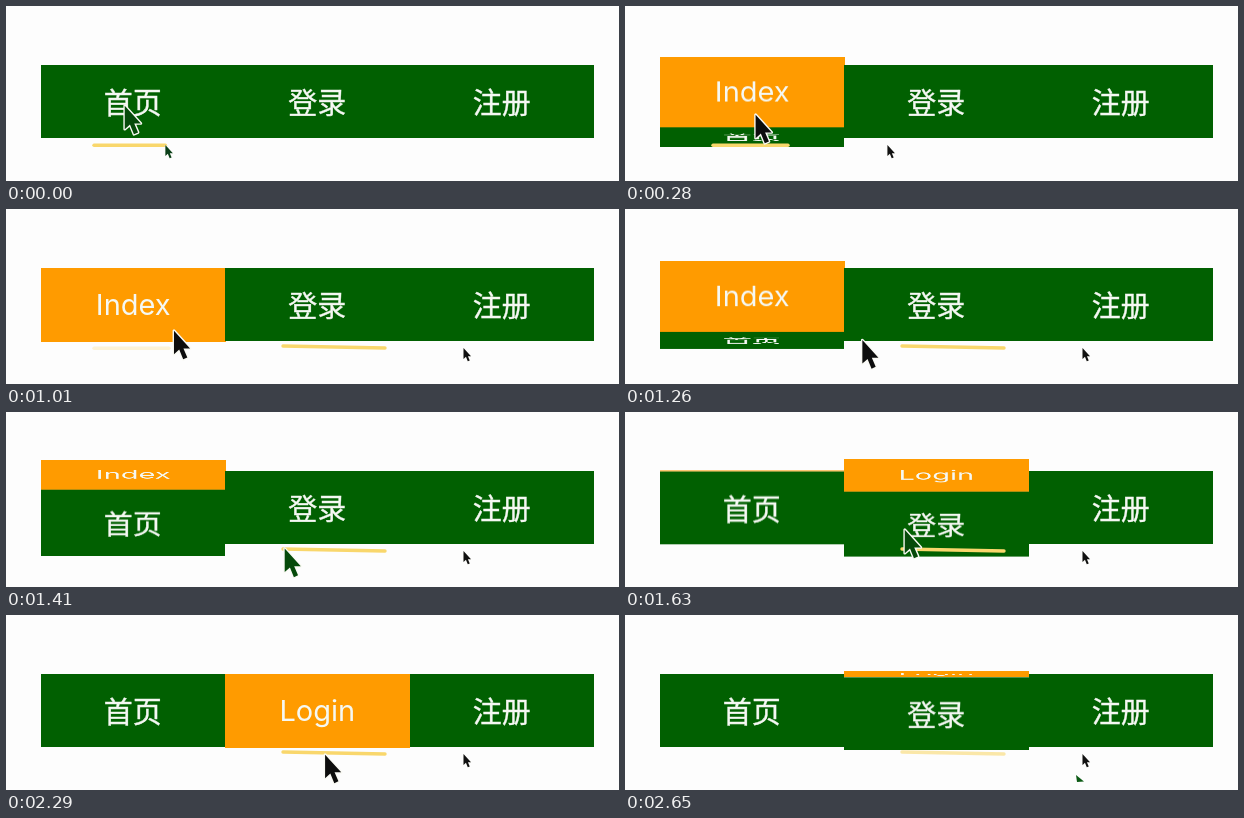
Animation of 613x175 px, one loop 2720 ms. Source, as an HTML page:

```html
<!DOCTYPE html>
<html lang="zh">
<head>
<meta charset="utf-8">
<title>Cube navigation</title>
<style>
  html, body { margin: 0; width: 100%; height: 100%; overflow: hidden; background: #fdfdfd; }
  nav {
    position: absolute; left: 34.5px; top: 58.5px; width: 553.5px; height: 73.5px;
    display: flex;
    font: 29px/73.5px "Noto Sans CJK SC", "Noto Sans CJK", sans-serif;
    color: #f5f8f3; text-align: center;
    filter: blur(.4px);
  }
  .cube { position: relative; flex: 1; transform-style: preserve-3d; }
  .cube span { position: absolute; inset: 0; backface-visibility: hidden; }
  .front {
    background: #016001; transform: translateZ(36.75px);
    -webkit-text-stroke: .4px;
  }
  .top {
    background: #ff9b00; transform: rotateX(90deg) translateZ(36.75px);
    font-family: Inter, sans-serif;
  }
  svg { position: absolute; left: 0; top: 0; }
  .mark { stroke: #f9d76c; stroke-width: 3.4; stroke-linecap: round; }
  .arrow { stroke: #fafaf4; paint-order: stroke; stroke-linejoin: round; }
</style>
</head>
<body>
<nav>
  <div class="cube"><span class="front">首页</span><span class="top">Index</span></div>
  <div class="cube"><span class="front">登录</span><span class="top">Login</span></div>
  <div class="cube"><span class="front">注册</span></div>
</nav>
<svg width="613" height="175" viewBox="0 0 613 175">
  <defs>
    <path id="shape" d="M0 0V25.5L5.7 20.5L10 31L14.5 29L10.3 19.2H17.5Z"/>
    <path id="bar" d="M-6 -14Q0 -14 0 -9Q0 -14 6 -14M0 -9V9M-6 14Q0 14 0 9Q0 14 6 14M-4 1H4"/>
  </defs>
  <line id="mark1" class="mark" x1="88" y1="139.3" y2="139.3"/>
  <line id="mark2" class="mark" x1="277" y1="137"/>
  <use id="pen" class="arrow" href="#shape" stroke-width="2"/>
  <use id="arrow" class="arrow" href="#shape" stroke-width="3"/>
  <g id="beam" fill="none" stroke-linecap="round">
    <use href="#bar" stroke="#f4f6ee" stroke-width="5"/>
    <use href="#bar" stroke="#17472a" stroke-width="2.4"/>
  </g>
  <path id="tail" d="M451 160L459 166.5L452 167Z" fill="#0b5a14"/>
</svg>
<script>
  const LOOP = 2720, TURN = 500;

  // pointer way points: time, x, y
  const way = [
    [0, 118, 99], [590, 143, 118], [1010, 167, 121], [1410, 278, 136],
    [1630, 279, 117], [2290, 318, 139], [2600, 440, 137]
  ];

  const $ = id => document.getElementById(id);
  const cubes = document.querySelectorAll('.cube');
  const clamp = (v, lo, hi) => Math.min(hi, Math.max(lo, v));
  const ramp = (t, from, to) => clamp((t - from) / (to - from), 0, 1);

  function pointerAt(t) {
    const n = clamp(way.findIndex(k => k[0] > t), 0, way.length) || way.length - 1;
    const a = way[n - 1], b = way[n], p = ramp(t, a[0], b[0]);
    return [1, 2].map(i => a[i] + (b[i] - a[i]) * p);
  }

  // CSS "ease": cubic-bezier(.25, .1, .25, 1)
  function ease(x) {
    const curve = (a, b, u) => 3 * a * u * (1 - u) ** 2 + 3 * b * u * u * (1 - u) + u ** 3;
    let lo = 0, hi = 1;
    for (let i = 0; i < 20; i++) {
      const mid = (lo + hi) / 2;
      if (curve(.25, .25, mid) < x) lo = mid; else hi = mid;
    }
    return curve(.1, 1, lo);
  }

  const turn = (t, enter, leave) =>
    90 * (ease(ramp(t, enter, enter + TURN)) - ease(ramp(t, leave, leave + TURN)));
  const show = (el, on) => el.setAttribute('visibility', on ? 'visible' : 'hidden');
  const place = (el, x, y, s = 1) =>
    el.setAttribute('transform', `translate(${x} ${y}) scale(${s})`);

  function set(el, attrs) {
    for (const name in attrs) el.setAttribute(name, attrs[name]);
  }

  function stall(t) {
    const since = (t - 520) % 556;
    return Math.min(since >= 0 && since < 70 ? t - since : t, 2650);
  }

  function draw(time) {
    const t = stall(time);

    const angles = [turn(t, 20, 1195), turn(t, 1530, 2295)];
    angles.forEach((a, i) => cubes[i].style.transform = `rotateX(${-a}deg)`);

    // the pen moves evenly and draws both underlines on its way
    const penX = 159 + 298.5 * ramp(t, 0, 811);
    const end2 = clamp(penX - 24, 277, 379);
    set($('mark1'), { x2: Math.min(penX, 163), opacity: 1 - ramp(t, 500, 1200) });
    set($('mark2'), {
      x2: end2, y2: 137 + (end2 - 277) * .02, opacity: 1 - .5 * ramp(t, 2290, LOOP)
    });
    show($('mark2'), penX > 301);
    place($('pen'), penX, 139, .43);
    $('pen').setAttribute('fill', t < 40 ? '#0b3f18' : '#111');

    const [x, y] = pointerAt(t);
    const beam = t >= 300 && t < 780;
    place($('arrow'), x + .7, y + .7, .92);
    place($('beam'), x, y);
    show($('arrow'), !beam && t < 2600);
    show($('beam'), beam);
    $('arrow').setAttribute('fill', Math.max(...angles) < 45 ? '#064a0a' : '#0d0d0d');
    show($('tail'), t >= 2600);
  }

  const start = performance.now();
  function tick() {
    draw((performance.now() - start) % LOOP);
    requestAnimationFrame(tick);
  }
  tick();
</script>
</body>
</html>
```
